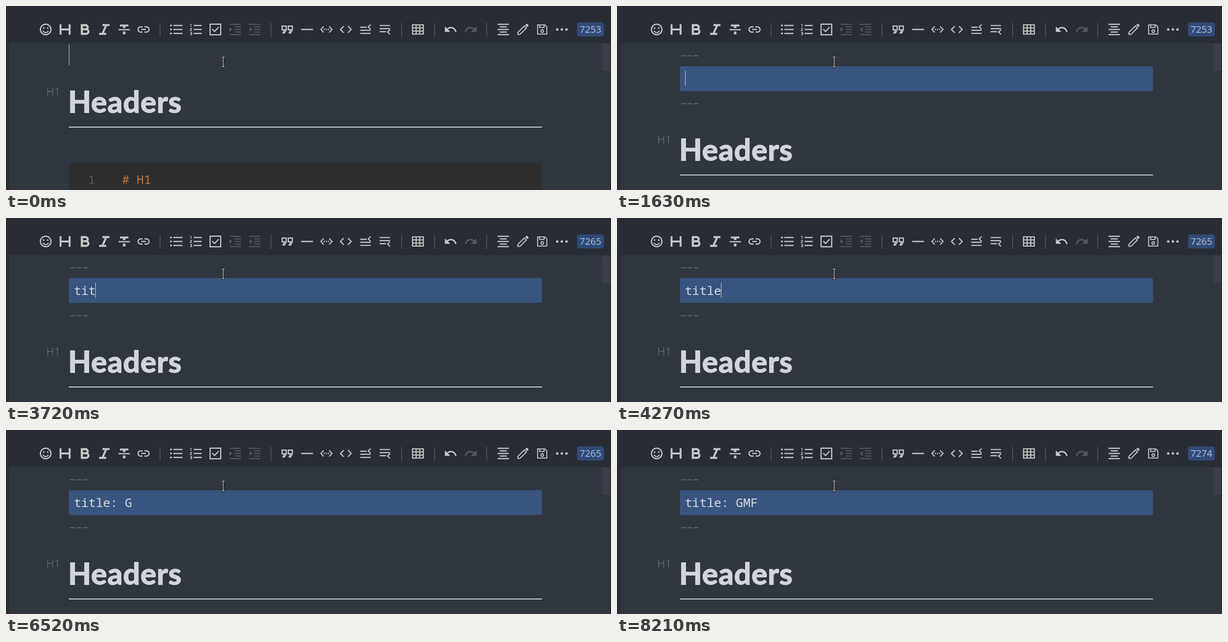
Recreate the animation shown at these times as an HTML page. Size 1280 by 392 pixels, loop 8630 ms.

```html
<!DOCTYPE html>
<html lang="en">
<head>
<meta charset="utf-8">
<title>Editor front matter</title>
<style>
html, body { margin: 0; width: 100%; height: 100%; overflow: hidden; background: #282c34; }
svg { display: block; width: 100vw; height: 100vh; }
text { white-space: pre; font-family: "Open Sans", sans-serif; }
.mono { font: 25.7px "Noto Sans Mono", monospace; }
.dash { font-size: 43px; font-weight: 300; }
.title { font: bold 63px Lato, sans-serif; letter-spacing: 1px; stroke: #d1d5da; stroke-width: 1.8; }
.icon { fill: none; stroke: #c3c5c8; stroke-width: 2.5; }
.icon .solid { fill: #c3c5c8; stroke: none; }
.icon.dim { stroke: #575b60; }
.icon.dim .solid { fill: #575b60; }
</style>
</head>
<body>
<svg viewBox="0 0 1280 392">
  <rect x="6" y="79" width="1272" height="313" fill="#2f363d"/>
  <g id="bar"></g>
  <rect x="1208" y="35" width="57" height="30" rx="5" fill="#304b79"/>
  <text id="count" x="1236.5" y="57" font-size="20.2" text-anchor="middle" fill="#b8c2d2"></text>
  <rect x="1262" y="80" width="16" height="58" fill="#3b3e48"/>

  <g id="doc">
    <text x="85" y="191" font-size="23" fill="#5d6168">H1</text>
    <text class="title" x="131.5" y="227.3" fill="#d1d5da">Headers</text>
    <rect x="133" y="257" width="1001" height="2" fill="#d1d5da"/>
    <rect x="133" y="334" width="1001" height="90" rx="6" fill="#2d2d2d"/>
    <text class="mono" x="173.5" y="379" fill="#5a5a5a">1</text>
    <text class="mono" x="245.5" y="379" fill="#cc7832">#&#160;H1</text>
  </g>

  <text id="dashes" class="dash" x="133.2" y="118" fill="#d1d5da"></text>
  <g id="matter">
    <text class="dash" x="133.2" y="118" fill="#6a6f75">---</text>
    <rect x="133" y="128" width="1001" height="53" rx="4" fill="#39547f"/>
    <text class="dash" x="133.2" y="220" fill="#6a6f75">---</text>
    <text id="field" class="mono" x="143.7" y="164" fill="#d6d9de"></text>
  </g>
  <rect id="caret" width="1" fill="#d1d5da"/>

  <g fill="none" transform="translate(-.5 0)">
    <path d="M456 108.5h3l1 1 1-1h3M460 109v20M456 129.5h3l1-1 1 1h3" stroke="#000" stroke-width="3"/>
    <path d="M456.5 108.5h2.5l1 1 1-1h2.5M460 109v20M456.5 129.5h2.5l1-1 1 1h2.5" stroke="#fff" stroke-width="1.2"/>
  </g>
</svg>
<script>
const $ = id => document.getElementById(id);

// Icon parts are drawn around their own centre
const line = (d, w = 2.5) => `<path d="${d}" stroke-width="${w}"/>`;
const solid = d => `<path class="solid" d="${d}"/>`;
const dot = (x, y, r) => `<circle class="solid" cx="${x}" cy="${y}" r="${r}"/>`;
const rules = "M-12-11H12M-1-5.5H12M-1 0H12M-1 5.5H12M-12 11H12";
const undo = solid("M-12.5-6.5V5H-1z") + line("M-8 0C-2-6.5 8-5.5 11 5.5", 3);
const before = line("M-11.5-4.8H2M-11.5 1.8H10.5M-11.5 8.4H10.5M10.5-10.5l-5.2 5 5.2 5", 2.4);

const icons = [
  [84, '<circle r="11.2"/>' + dot(-4.3, -3, 1.8) + dot(4.3, -3, 1.8) + line("M-6 3Q0 10.5 6 3", 2.2)],
  [125, line("M-9.6-11.2v22.4M9.6-11.2v22.4M-9 0H9", 4)],
  [167, line("M-6.5-9.2H1.5a4.4 4.4 0 0 1 0 8.8H-6.5M1.5-.4H2.5a4.8 4.8 0 0 1 0 9.6H-6.5V-9.2H0", 4.5)],
  [208, line("M-4-9.4H11M-11 9.4H4M4-9L-4 9", 4.3)],
  [250, solid("M-9-10.5H9v4H2.6v3.5h-5.2v-3.5H-9zM-12-.8H12v2.6H-12zM-2.6 4.4h5.2v6h-5.2z")],
  [291, line("M-2-5.5H-6.2a5.5 5.5 0 0 0 0 11H-2M2-5.5H6.2a5.5 5.5 0 0 1 0 11H2M-5 0H5")],
  [360, [-8.5, 0, 8.5].map(y => dot(-11, y, 2.1) + line(`M-6 ${y}H13.5`)).join("")],
  [402, line("M-5-8.5H12M-5 0H12M-5 8.5H12") +
        line("M-12.5-10.8h2v5.3M-12.5-2.4h3.3l-3.3 4.6h4M-12.5 6.2h3.3v5h-3.3M-11.5 8.7h2", 1.4)],
  [443, line("M-11.2-11.2H11.2V11.2H-11.2zM-6.5-.5l4.8 4.8L7-5")],
  [485, line(rules, 2.2) + solid("M-12-5l5.5 5-5.5 5z"), "dim"],
  [526, line(rules, 2.2) + solid("M-6.5-5l-5.5 5 5.5 5z"), "dim"],
  [595, line("M-2.2-7.2H-10.8V.8H-5.5L-8.8 7.5H-5.8L-2.2 .8zM10.8-7.2H2.2V.8H7.5L4.2 7.5H7.2L10.8 .8z")],
  [637, line("M-12.5 0H12.5", 2.7)],
  [678, line("M-5.8-6.5l-6 6.5 6 6.5M5.8-6.5l6 6.5-6 6.5", 2.3) + [-4.4, 0, 4.4].map(x => dot(x, 0, 1.4)).join("")],
  [719, line("M-4.5-7l-6.8 7 6.8 7M4.5-7l6.8 7-6.8 7")],
  [761, before],
  [802, `<g transform="scale(1 -1)">${before}</g>`],
  [871.5, line("M-11.4-9.8H11.4V9.8H-11.4zM-11-3.3H11M-11 3.3H11M-3.8-10V10M3.8-10V10", 2.3)],
  [941, undo],
  [983, `<g transform="scale(-1 1)">${undo}</g>`, "dim"],
  [1052, line("M-12-11H12M-7.5-5.5H7.5M-12 0H12M-7.5 5.5H7.5M-12 11H12")],
  [1093.5, line("M-10.5 10.5v-4.3L3.2-7.5l4.3 4.3L-6.2 10.5z", 2.2) +
           solid("M5-9.6l2.2-2.2q1.2-.8 2.4.3l2.1 2.1q.9 1 0 2.2L9.5-5z")],
  [1134.5, line("M-9.8-9.8H5.6L9.8-5.6V9.8H-9.8zM-5.5-9.5V-4.2H4V-9.5", 2) + '<circle cy="3.4" r="2.8" stroke-width="2"/>'],
  [1176, [-9.8, 0, 9.8].map(x => dot(x, 0, 2.6)).join("")]
];

$("bar").innerHTML =
  icons.map(([x, art, tone = ""]) => `<g class="icon ${tone}" transform="translate(${x} 50)">${art}</g>`).join("") +
  [326, 560.5, 837, 906.5, 1017].map(x => `<path d="M${x} 36v30" stroke="#55595f" stroke-width="1.6"/>`).join("");

// [start, typed text, caret shown]
const steps = [
  [0, "", 1], [450, "", 0], [1000, "", 1], [1230, "-", 1], [1380, "--", 1],
  [1630, "", 1], [2160, "", 0], [2390, "", 1], [2940, "t", 1], [3470, "t", 0],
  [3550, "ti", 1], [3720, "tit", 1], [4040, "titl", 1], [4270, "title", 1],
  [4730, "title:", 1], [5190, "title: ", 1], [5800, "title: ", 0],
  [5950, "title: G", 1], [6520, "title: G", 0], [6670, "title: GM", 1],
  [6900, "title: GMF", 1], [7450, "title: GMF", 0], [7680, "title: GMF", 1], [8210, "title: GMF", 0]
];
const stops = [144, 158, 174, 189, 204, 220, 235, 251, 267, 282, 298];
const loop = 8630, opened = 1630;
const show = (id, on) => $(id).setAttribute("visibility", on ? "visible" : "hidden");

function draw(now) {
  const t = now % loop;
  const [, text, caretOn] = steps.findLast(s => s[0] <= t);
  const open = t >= opened;
  $("doc").setAttribute("transform", `translate(0 ${open ? 102 : 0})`);
  show("matter", open);
  $("dashes").textContent = open ? "" : text;
  $("field").textContent = open ? text : "";
  $("count").textContent = t < 2390 ? 7253 : t < 7680 ? 7265 : 7274;
  const caret = $("caret");
  caret.setAttribute("x", open ? stops[text.length] : 133 + 14 * text.length);
  caret.setAttribute("y", open ? 138 : 82);
  caret.setAttribute("height", open ? 32 : 44);
  show("caret", caretOn);
  requestAnimationFrame(draw);
}
draw(performance.now());
</script>
</body>
</html>
```
